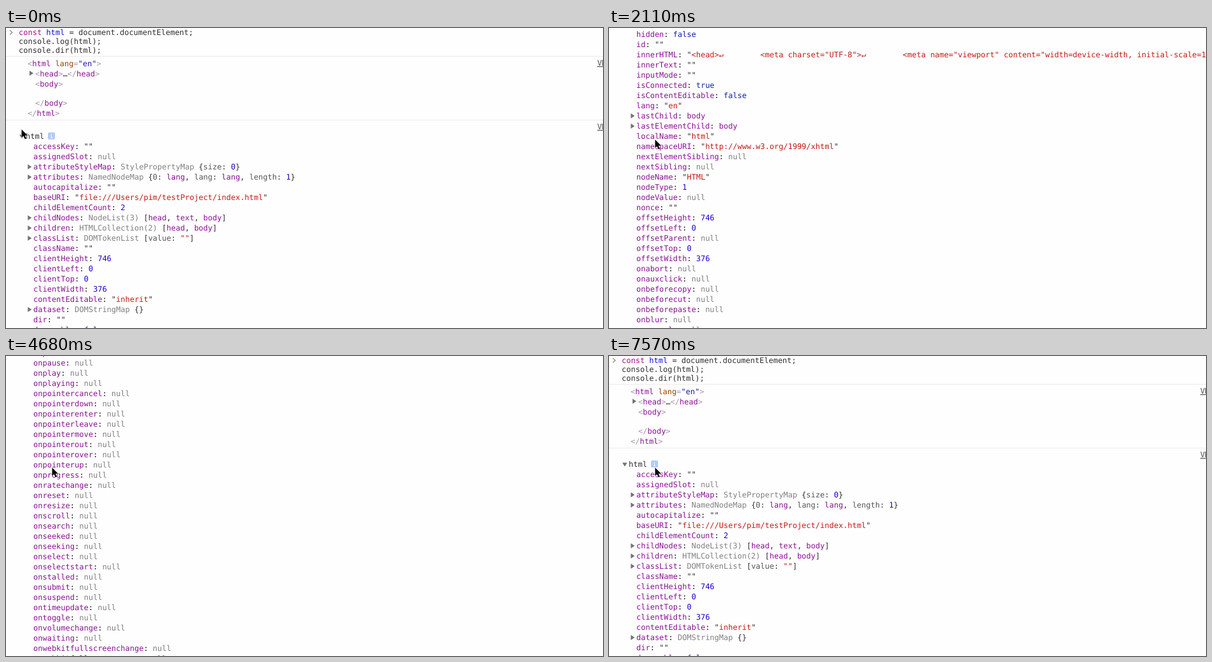
Recreate the animation shown at these times as an HTML page. Size 939x471 px, loop 8 s.

```html
<!DOCTYPE html>
<html lang="en">
<head>
<meta charset="utf-8">
<title>Console object listing</title>
<style>
  html, body { margin: 0; width: 100%; height: 100%; overflow: hidden; background: #fefefe; }
  svg { display: block; }
  text {
    font: 12px "DejaVu Sans Mono", "Liberation Mono", monospace;
    white-space: pre;
    text-rendering: geometricPrecision;
    fill: #303030;
  }
  .name, .tag { fill: #881391; }
  .keyword { fill: #aa0d91; }
  .def { fill: #1010e0; }
  .bracket { fill: #a894a6; }
  .attr { fill: #994500; }
  .attrVal { fill: #1a1aa6; }
  .null { fill: #808080; }
  .num { fill: #1c00cf; }
  .bool { fill: #0d22aa; }
  .str { fill: #c41a16; }
  .key { fill: #565656; }
  .colon { fill: #111; }
  .link { fill: #545454; text-decoration: underline; }
</style>
</head>
<body>
<svg width="939" height="471" viewBox="0 0 939 471">
  <g id="page"></g>
  <path id="cursor" d="M1.5 1.2V14.4L4.5 11.6 6.8 16.4 9 15.4 6.8 10.7H11Z"
    fill="#000" stroke="#fff" stroke-width="1" paint-order="stroke"/>
</svg>
<script>
const NS = "http://www.w3.org/2000/svg";
const page = document.getElementById("page");
const cursor = document.getElementById("cursor");
const LOOP = 8000, ROW = 16, FIRST_ROW = 186;

function add(parent, tag, attrs, content) {
  const el = document.createElementNS(NS, tag);
  for (const key in attrs) el.setAttribute(key, attrs[key]);
  if (content) el.textContent = content;
  parent.appendChild(el);
  return el;
}

// One line of text, centred on y, made of [class, text] parts.
function line(x, y, parts) {
  const el = add(page, "text", { x, y: y + 4 });
  for (const [cls, str] of parts) add(el, "tspan", { class: cls }, str);
}

function closedArrow(x, y) {
  add(page, "path", { d: `M${x} ${y - 4}l6 4-6 4z`, fill: "#727272" });
}

// Splits "<name" / "name>" style markup into coloured parts.
function markup(src) {
  return src.match(/<\/?|>|"[^"]*"|=|\w+|[^\w<>="]+/g).map((part, i, all) => {
    if (/[<>=]/.test(part)) return ["bracket", part];
    if (part[0] === '"') return ["attrVal", part];
    if (all[i + 1] === "=") return ["attr", part];
    return [/^\w/.test(part) ? "tag" : "plain", part];
  });
}

// An object preview: grey class name, then keys and values.
function preview(src) {
  const cut = src.indexOf(" ");
  const parts = src.slice(cut).match(/""|\w+(?=:)|\d+|[a-z]+|[^\w"]+/gi);
  return [["null", src.slice(0, cut)]].concat(parts.map((part, i) => {
    if (part === '""') return ["str", part];
    if ((parts[i + 1] || "")[0] === ":") return ["key", part];
    if (/^\d/.test(part)) return ["num", part];
    return [/^\w/.test(part) ? "tag" : "plain", part];
  }));
}

function value(src) {
  if (src === "null") return [["null", src]];
  if (/^(true|false)$/.test(src)) return [["bool", src]];
  if (/^-?\d+$/.test(src)) return [["num", src]];
  if (src[0] === '"') return [["plain", '"'], ["str", src.slice(1, -1)], ["plain", '"']];
  if (/^[A-Z]\S* [{[]/.test(src)) return preview(src);
  return [["tag", src]];
}

const GAP = "↵" + " ".repeat(8);
const META = `${GAP}<meta charset="UTF-8">${GAP}<meta name="viewport" content="width=device-width, initial-scale=1.0">`;
const TEXT = GAP.repeat(4) + "Document" + GAP + "↵    ↵    ↵↵";

const handlers = `abort auxclick beforecopy beforecut beforepaste blur cancel canplay
  canplaythrough change click close contextmenu copy cuechange cut dblclick drag dragend
  dragenter dragleave dragover dragstart drop durationchange emptied ended error focus
  gotpointercapture input invalid keydown keypress keyup load loadeddata loadedmetadata
  loadstart lostpointercapture mousedown mouseenter mouseleave mousemove mouseout mouseover
  mouseup mousewheel paste pause play playing pointercancel pointerdown pointerenter
  pointerleave pointermove pointerout pointerover pointerup progress ratechange reset resize
  scroll search seeked seeking select selectstart stalled submit suspend timeupdate toggle
  volumechange waiting webkitfullscreenchange webkitfullscreenerror wheel`
  .split(/\s+/).map(name => `on${name}: null`).join("\n");

// A leading ">" marks an expandable property.
const props = `accessKey: ""
assignedSlot: null
>attributeStyleMap: StylePropertyMap {size: 0}
>attributes: NamedNodeMap {0: lang, lang: lang, length: 1}
autocapitalize: ""
baseURI: "file:///Users/pim/testProject/index.html"
childElementCount: 2
>childNodes: NodeList(3) [head, text, body]
>children: HTMLCollection(2) [head, body]
>classList: DOMTokenList [value: ""]
className: ""
clientHeight: 746
clientLeft: 0
clientTop: 0
clientWidth: 376
contentEditable: "inherit"
>dataset: DOMStringMap {}
dir: ""
draggable: false
>firstChild: head
>firstElementChild: head
hidden: false
id: ""
innerHTML: "<head>${META}"
innerText: ""
inputMode: ""
isConnected: true
isContentEditable: false
lang: "en"
>lastChild: body
>lastElementChild: body
localName: "html"
namespaceURI: "http://www.w3.org/1999/xhtml"
nextElementSibling: null
nextSibling: null
nodeName: "HTML"
nodeType: 1
nodeValue: null
nonce: ""
offsetHeight: 746
offsetLeft: 0
offsetParent: null
offsetTop: 0
offsetWidth: 376
${handlers}
outerHTML: "<html lang="en"><head>${META}"
outerText: ""
>ownerDocument: document
parentElement: null
>parentNode: document
prefix: null
previousElementSibling: null
>previousSibling: <!DOCTYPE html>
scrollHeight: 746
scrollLeft: 0
scrollTop: 0
scrollWidth: 376
shadowRoot: null
slot: ""
spellcheck: true
>style: CSSStyleDeclaration {alignContent: "", alignItems: "", alignSelf: "", alignmentBaseline: "", all: "", …}
tabIndex: -1
tagName: "HTML"
textContent: "${TEXT}"
title: ""
translate: true
version: ""`.split("\n");

function build() {
  add(page, "path", { d: "M6 3.5l4 3.5-4 3.5", fill: "none", stroke: "#909090", "stroke-width": 1.3 });
  line(20, 7, [["keyword", "const"], ["def", " html"], ["plain", " = document.documentElement;"]]);
  line(20, 21, [["plain", "console.log(html);"]]);
  line(20, 35, [["plain", "console.dir(html);"]]);

  for (const y of [44, 144]) {
    add(page, "rect", { x: 0, y, width: 939, height: 1, fill: "#ececec" });
    line(930, y + 11, [["link", "VM157"]]);
  }

  line(34, 56, markup('<html lang="en">'));
  closedArrow(37, 71);
  line(46, 72, markup("<head>…</head>"));
  line(46, 88, markup("<body>"));
  line(46, 118, markup("</body>"));
  line(34, 134, markup("</html>"));

  add(page, "path", { d: "M21 167.5h7.6l-3.8 6z", fill: "#727272" });
  line(31, 170, [["plain", "html"]]);
  add(page, "rect", { x: 66, y: 164, width: 11, height: 11, rx: 2, fill: "#b0cbf8" });
  add(page, "path", { d: "M71.5 166v1.4M70.3 168.9h1.2v3.6M70 172.5h3", fill: "none", stroke: "#fff" });

  props.forEach((src, i) => {
    const y = FIRST_ROW + i * ROW;
    const [, arrow, name, val] = src.match(/^(>?)(\w+): (.*)$/);
    if (arrow) closedArrow(34.3, y);
    line(43, y, [["name", name], ["colon", ": "], ...value(val)]);
  });
}

// Wheel steps: time in ms and scroll offset.
const wheel = [
  [0, 0], [720, 20], [780, 64], [1170, 100], [1260, 142],
  [1610, 146], [1670, 210], [1730, 274], [1790, 322],
  [2030, 380], [2110, 512], [2470, 600], [2550, 703], [2910, 780], [3000, 868],
  [3260, 872], [3320, 980], [3350, 1040], [3620, 1046], [3680, 1170], [3700, 1240],
  [3970, 1246], [4000, 1280], [4030, 1333], [4090, 1444],
  [4320, 1450], [4350, 1570], [4380, 1659], [4680, 1663], [4740, 1770], [4760, 1850],
  [5060, 1856], [5120, 1980], [5240, 2036],
  [6200, 2031], [6380, 2010], [6440, 1930], [6550, 1850], [6820, 1700], [6880, 1440],
  [7150, 1300], [7210, 800], [7300, 420], [7480, 210], [7570, 0]
];

function scrollAt(t) {
  let y = 0;
  for (const [start, offset] of wheel) if (t >= start) y = offset;
  return y;
}

function cursorAt(t) {
  if (t < 100) return [23, 158];
  const step = Math.max(0, Math.min(6, Math.floor((t - 400) / 30)));
  const k = step / 6;
  const ease = k * k * (3 - 2 * k);
  return [Math.round(24 + 47 * ease), Math.round(158 + 15.5 * ease)];
}

function draw(t) {
  page.setAttribute("transform", `translate(0 ${-scrollAt(t)})`);
  cursor.setAttribute("transform", `translate(${cursorAt(t)})`);
}

build();
draw(0);
const begin = performance.now();
function tick() {
  draw((performance.now() - begin) % LOOP);
  requestAnimationFrame(tick);
}
requestAnimationFrame(tick);
</script>
</body>
</html>
```
